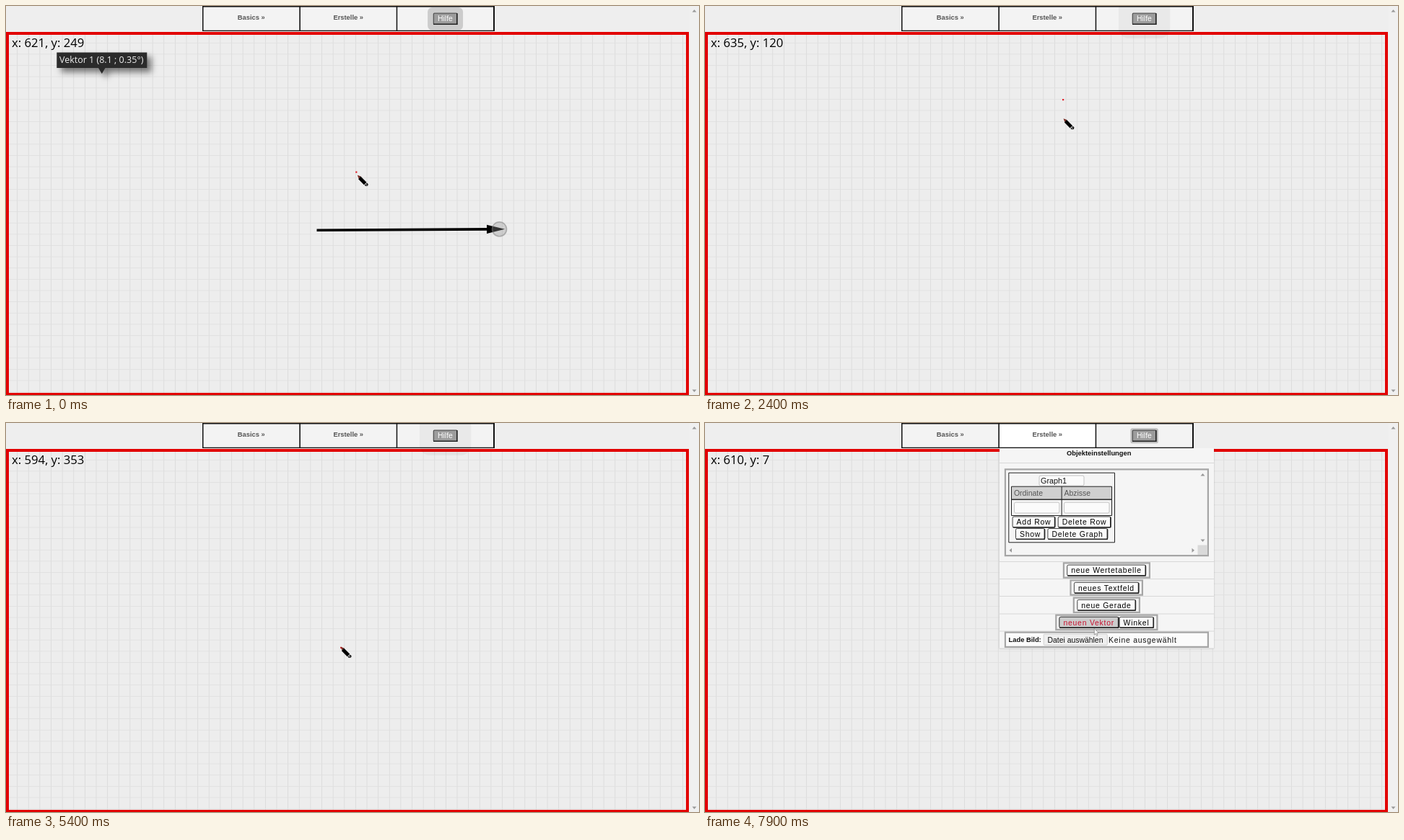
An HTML page with a canvas that plays this animation: 960x540 px, repeating every 8000 ms.

```html
<!DOCTYPE html>
<html lang="de">
<head>
<meta charset="utf-8">
<title>Vektor-Editor</title>
<style>
html, body { margin: 0; width: 100%; height: 100%; overflow: hidden; background: #eee; }
canvas { display: block; }
</style>
</head>
<body>
<canvas id="stage" width="960" height="540"></canvas>
<script>
const LOOP = 8000, STEP = 100, SCALE = 1.28, TOP = 36;
const ARIAL = '"Liberation Sans", Arial, sans-serif';
const HUMAN = '"Open Sans", "Noto Sans", sans-serif';
const screen = document.getElementById('stage').getContext('2d');
let g = screen;

// Pointer path: time, x, y
const path = [
  [-100, 485.2, 230.5], [0, 487.3, 235.8], [200, 490.5, 239], [600, 490.5, 239],
  [1300, 493.75, 142.3], [1500, 493.75, 142.3], [1900, 500, 136], [2300, 496, 130],
  [3100, 504, 347], [3200, 501.6, 317.3], [3300, 453.5, 281.5], [3500, 456, 300],
  [3900, 464.1, 311.8], [5700, 464.1, 311.8], [6400, 476.6, 41.5],
  [6600, 480.5, 14], [7500, 480.5, 14], [7900, 539.3, 285.5]
];

function pointer(t) {
  let i = 1;
  while (i < path.length - 1 && path[i][0] < t) i++;
  const [t0, x0, y0] = path[i - 1], [t1, x1, y1] = path[i];
  const k = Math.min(1, Math.max(0, (t - t0) / (t1 - t0)));
  return [x0 + (x1 - x0) * k, y0 + (y1 - y0) * k];
}

function fill(x, y, x2, y2, color) {
  g.fillStyle = color;
  g.fillRect(x, y, x2 - x, y2 - y);
}

// Rounded box whose border lies inside the given edges
function box(x, y, x2, y2, color, line, width = 1, radius = 0) {
  const h = width / 2;
  g.beginPath();
  g.roundRect(x + h, y + h, x2 - x - width, y2 - y - width, radius);
  if (color) { g.fillStyle = color; g.fill(); }
  if (line) { g.strokeStyle = line; g.lineWidth = width; g.stroke(); }
}

function text(s, x, y, font, color, spacing = 0, align = 'left') {
  g.font = font;
  g.fillStyle = color;
  g.letterSpacing = spacing + 'px';
  g.textAlign = align;
  g.fillText(s, x, y);
}

function shape(points, color, line, width = 1) {
  g.beginPath();
  points.forEach(([x, y]) => g.lineTo(x, y));
  g.closePath();
  if (color) { g.fillStyle = color; g.fill(); }
  if (line) { g.strokeStyle = line; g.lineWidth = width; g.stroke(); }
}

// Small scroll arrow pointing along (dx, dy)
function scrollArrow(x, y, dx, dy) {
  shape([[x + dx * 2, y + dy * 2], [x - dx * 1.5 + dy * 3, y - dy * 1.5 + dx * 3],
    [x - dx * 1.5 - dy * 3, y - dy * 1.5 - dx * 3]], '#999');
}

function button(label, x, y, x2, hover) {
  box(x, y, x2, y + 16, hover ? '#ccc' : '#fafafa', '#444', 1, 2);
  fill(x + 1, y + 14.5, x2 - 0.5, y + 16, '#222');
  fill(x2 - 1.7, y + 1, x2 - 0.2, y + 15.5, '#222');
  text(label, x + 6, y + 11.8, '10.42px ' + ARIAL, hover ? '#c8102e' : '#000', 0.78);
}

const frame = (x, y, x2, y2, color) => box(x, y, x2, y2, color, '#a6a6a6', 2.2);
const input = (x, y, x2, y2) => box(x, y, x2, y2, '#fbfbfb', '#c4c4c4', 1, 2);

function drawMenu() {
  const plain = '10.42px ' + ARIAL, bold = 'bold 9.375px ' + ARIAL;
  g.shadowColor = 'rgba(0,0,0,.25)';
  g.shadowBlur = 2;
  fill(408, 35, 705, 313, '#f5f5f5');
  g.shadowColor = 'transparent';
  for (const y of [55, 192, 216, 240, 264.5, 288.5, 312.5]) fill(408, y, 705, y + 1, '#d8d8d8');
  text('Objekteinstellungen', 501, 44.5, bold, '#111');

  frame(414.8, 63.3, 698, 185.2);
  scrollArrow(689.5, 72, 0, -1);
  scrollArrow(689.5, 163, 0, 1);
  scrollArrow(423.5, 176.8, -1, 0);
  scrollArrow(676, 176.8, 1, 0);
  fill(682.5, 169.5, 696, 183, '#d9d9d9');

  box(420.3, 68.7, 568, 166.3, null, '#222');
  input(462.5, 72.5, 525.5, 87.5);
  text('Graph1', 465, 83.8, '10.8px ' + ARIAL, '#111');
  box(424, 87.7, 564, 106.7, '#d0d0d0', '#222');
  box(424, 105.7, 564, 129, null, '#222');
  fill(493.6, 88, 494.6, 129, '#222');
  text('Ordinate', 428, 101, plain, '#555');
  text('Abzisse', 497.5, 101, plain, '#555');
  input(428, 109.7, 491.3, 125.5);
  input(497, 109.7, 560.5, 125.5);
  button('Add Row', 425.6, 129.5, 485.5);
  button('Delete Row', 488.7, 129.5, 562.7);
  button('Show', 430, 146, 471.3);
  button('Delete Graph', 474.4, 146, 558.3);

  frame(495.8, 193.3, 617, 215.7);
  button('neue Wertetabelle', 501.2, 196.6, 611.2);
  frame(505.4, 217.4, 607, 239.8);
  button('neues Textfeld', 510.9, 220.8, 601.5);
  frame(509.7, 241.5, 603, 263.9);
  button('neue Gerade', 515.3, 244.8, 597.2);
  frame(485.2, 265.5, 627.5, 288);
  button('neuen Vektor', 490.4, 268.8, 573.6);
  button('Winkel', 573.6, 268.8, 622.1);

  frame(414.8, 289.6, 698, 312, '#fbfbfb');
  text('Lade Bild:', 420.5, 304.2, bold, '#111');
  box(468.7, 292.7, 557.7, 308.8, '#efefef', '#d2d2d2', 1, 1);
  text('Datei auswählen', 474.5, 304.6, plain, '#111');
  text('Keine ausgewählt', 559, 304.6, plain, '#111', 0.78);
}

function drawBoard(t) {
  const cell = 20 / SCALE;
  fill(0, TOP, 946, 540, '#ededed');
  for (let x = cell; x < 942; x += cell) fill(x - 0.4, 40, x + 0.4, 537, '#d9d9d9');
  for (let y = TOP - 0.4 + cell; y < 537; y += cell) fill(4, y - 0.4, 942, y + 0.4, '#dfdfdf');
  g.strokeStyle = '#e20000';
  g.lineWidth = 4;
  g.strokeRect(2, TOP + 2, 942, 501);
  // The readout trails the pointer and stays put once it leaves the board
  const [x, y] = pointer(Math.min(t - STEP, 6400));
  fill(x - 1, y - 1, x + 1.2, y + 1.2, '#e2222b');
  text(`x: ${Math.round(x * SCALE)}, y: ${Math.round((y - TOP) * SCALE)}`,
    8, 57.3, '16.7px ' + HUMAN, '#000');
}

function drawVector() {
  g.strokeStyle = '#000';
  g.lineWidth = 3.6;
  g.beginPath();
  g.moveTo(430.5, 311.2);
  g.lineTo(668, 309.9);
  g.stroke();
  shape([[666, 303.8], [691, 309.8], [666, 316]], '#000');
  g.beginPath();
  g.arc(683.5, 309.8, 10, 0, 7);
  g.fillStyle = 'rgba(150,150,150,.35)';
  g.fill();
  g.strokeStyle = 'rgba(130,130,130,.55)';
  g.lineWidth = 1.6;
  g.stroke();

  g.shadowColor = 'rgba(0,0,0,.5)';
  g.shadowBlur = 8;
  g.shadowOffsetX = g.shadowOffsetY = 6;
  g.fillStyle = '#2b2b2b';
  g.beginPath();
  g.rect(70.3, 64.4, 125, 21.6);
  g.moveTo(128, 86);
  g.lineTo(137.5, 86);
  g.lineTo(132.8, 94);
  g.fill();
  g.shadowColor = 'transparent';
  text('Vektor 1 (8.1 ; 0.35°)', 74, 79, '12.5px ' + HUMAN, '#eee');
}

function drawNav(t) {
  const bold = 'bold 9.375px ' + ARIAL;
  const open = t >= 6600, hover = open && t < 7600;
  fill(272, 0, 677, 35, '#111');
  fill(273.5, 1.5, 406.3, 33.7, '#f3f3f3');
  fill(407.9, 1.5, 540.7, 33.7, open ? '#fff' : '#f3f3f3');
  fill(542.2, 1.5, 675, 33.7, '#f3f3f3');
  text('Basics »', 339.8, 19.3, bold, '#555', 0, 'center');
  text('Erstelle »', 474.2, 19.3, bold, hover ? '#b5121b' : '#555', 0, 'center');
}

function drawHelp(t) {
  // The pulse restarts when the page reloads and rests for a moment at 5400
  const clock = t >= 5400 && t < 5800 ? 5400 : t;
  const phase = t < 300 ? t + 230 : (clock - 330 + 1500) % 1500;
  const s = phase * 0.033;
  if (s < 19.5 && (t < 300 || t >= 500)) {
    g.fillStyle = `rgba(0,0,0,${0.24 * (1 - s / 23)})`;
    g.beginPath();
    g.roundRect(591.7 - s, 9.5 - s, 33.8 + 2 * s, 16.5 + 2 * s, 1 + s * 0.7);
    g.fill();
  }
  box(591.7, 9.5, 625.5, 26, '#9c9c9c', '#555', 1.3, 1);
  fill(592, 24.6, 625.5, 26, '#222');
  fill(624, 10, 625.5, 26, '#222');
  text('Hilfe', 608.4, 21.4, '10.42px ' + ARIAL, '#fff', 0, 'center');
}

function drawPen() {
  shape([[-0.5, -1], [4.3, 0.8], [1.3, 3.8]], '#7a2a22');
  shape([[4, 0.8], [12.2, 9], [8.6, 12.4], [0.8, 4.4]], '#000');
  shape([[12.8, 9.7], [14.3, 11.4], [14, 13.8], [11, 14.2], [9.3, 13]], '#111');
  fill(11.2, 11.8, 12.6, 13, '#ccc');
}

function drawArrow() {
  shape([[0, 0], [0, 8.6], [2, 6.8], [3.4, 9.8], [4.7, 9.2], [3.4, 6.2], [6, 6]], '#fff', '#888', 0.8);
}

function drawHand() {
  shape([[0, 0], [1.4, 0], [1.6, 3.6], [5.8, 4.6], [6, 8], [4.8, 11], [0.4, 11],
    [-2.6, 7], [-2, 6], [-0.2, 7]], '#fff', '#888', 0.8);
}

function drawCursor(t) {
  const [x, y] = pointer(t);
  g.save();
  g.translate(x, y);
  if (t >= 300 && t < 500 || t >= 7600) drawArrow();
  else if (y < TOP) drawHand();
  else drawPen();
  g.restore();
}

const menu = document.createElement('canvas');
menu.width = 960;
menu.height = 540;
g = menu.getContext('2d');
drawMenu();
g = screen;

function draw(t) {
  fill(0, 0, 960, 540, '#eee');
  fill(947, 0, 960, 540, '#f0f0f0');
  scrollArrow(953.5, 7, 0, -1);
  scrollArrow(953.5, 534, 0, 1);
  if (t < 300 || t >= 500) drawBoard(t);
  if (t < 300) drawVector();
  drawNav(t);
  drawHelp(t);
  if (t > 6600) {
    g.globalAlpha = Math.min(1, (t - 6600) / 280);
    g.drawImage(menu, 0, 35, 960, 505, 0, 35, 960, 505);
    g.globalAlpha = 1;
    if (t >= 7900) button('neuen Vektor', 490.4, 268.8, 573.6, true);
  }
  drawCursor(t);
}

const start = performance.now();
function tick() {
  const t = (performance.now() - start) % LOOP;
  draw(Math.floor(t / STEP) * STEP);
  requestAnimationFrame(tick);
}
tick();
</script>
</body>
</html>
```
